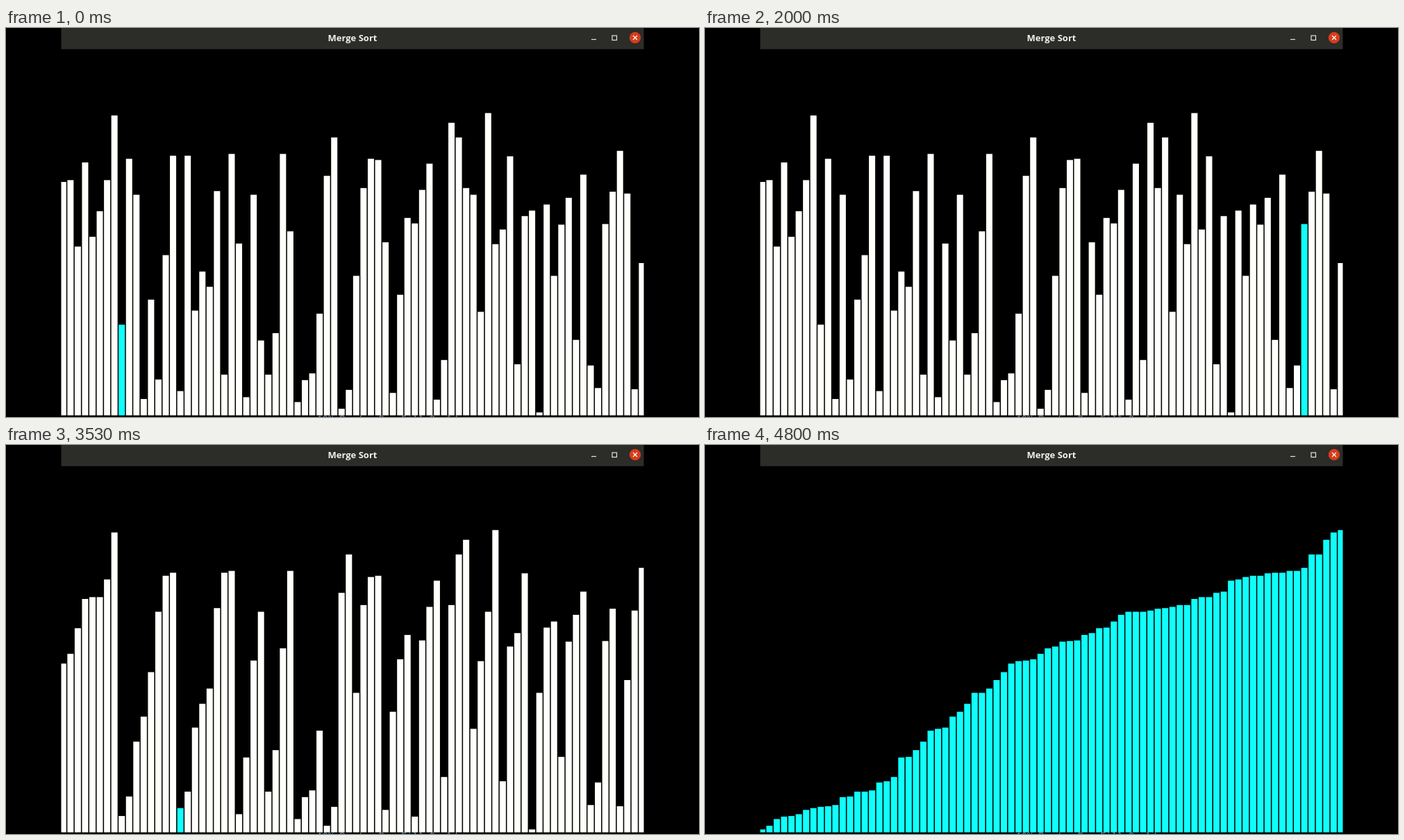
Animation, 998 px wide and 561 px high, one loop 4990 ms. Source, as an HTML page with a canvas:

```html
<!DOCTYPE html>
<html lang="en">
<head>
<meta charset="utf-8">
<title>Merge Sort</title>
<style>
  html, body { margin: 0; height: 100%; overflow: hidden; background: #000; }
  canvas { display: block; }
</style>
</head>
<body>
<canvas id="stage" width="998" height="561"></canvas>
<script>
const ctx = document.getElementById("stage").getContext("2d");
const LOOP = 4990;
const LEFT = 79.5, RIGHT = 918.5, TITLE_HEIGHT = 30.5, FLOOR = 558.8;
const SCALE = 0.8793, PITCH = 12 * SCALE, BAR_WIDTH = 9, FIRST_BAR = 77.8;
const BARS = 80, MAX_VALUE = 500;
const FIRST_STEP = 4.744, STEPS_PER_TICK = 1.094;
const WHITE = "#fffffb", CYAN = "#10fffb";

// Additive feedback generator, as used by the C library's rand().
function randomValues(count, seed) {
  const warmUp = 344, state = [seed];
  for (let i = 1; i < warmUp + count; i++) {
    if (i < 31) state[i] = (16807 * state[i - 1]) % 2147483647;
    else if (i < 34) state[i] = state[i - 31];
    else state[i] = (state[i - 3] + state[i - 31]) >>> 0;
  }
  return state.slice(warmUp).map(word => (word >>> 1) % MAX_VALUE);
}

// Bottom-up merge sort: one step per merged block, marked at its first bar.
function mergeSteps(values) {
  const steps = [];
  for (let size = 1; size < values.length; size *= 2) {
    for (let low = 0; low + size < values.length; low += 2 * size) {
      const high = low + 2 * size;
      values = [
        ...values.slice(0, low),
        ...values.slice(low, high).sort((a, b) => a - b),
        ...values.slice(high)
      ];
      steps.push({ values, mark: low });
    }
  }
  return steps;
}
const steps = mergeSteps(randomValues(BARS, 1));

// Three pictures every 200 ms.
function tickAt(time) {
  const rest = time % 200;
  return 3 * Math.floor(time / 200) + (rest >= 70) + (rest >= 130);
}

function rect(color, x, y, w, h) {
  ctx.fillStyle = color;
  ctx.fillRect(x, y, w, h);
}

function line(...points) {
  ctx.beginPath();
  points.forEach(([x, y], i) => i % 2 ? ctx.lineTo(x, y) : ctx.moveTo(x, y));
  ctx.stroke();
}

function drawWindow() {
  rect("#000", 0, 0, 998, 561);
  rect("#2c2c29", LEFT, 0, RIGHT - LEFT, TITLE_HEIGHT);

  ctx.textAlign = "center";
  ctx.fillStyle = "#f0f0ec";
  ctx.font = "bold 13px 'Open Sans', 'Noto Sans', sans-serif";
  ctx.fillText("Merge Sort", 499, 19.3);

  ctx.strokeStyle = "#e4e4e0";
  ctx.lineWidth = 1.2;
  line([843, 16.5], [850, 16.5]);
  ctx.strokeRect(873, 11, 6.5, 6.5);

  ctx.fillStyle = "#d63c1a";
  ctx.beginPath();
  ctx.arc(906, 14, 8.2, 0, 2 * Math.PI);
  ctx.fill();
  ctx.strokeStyle = "#fff";
  line([903, 11], [909, 17], [909, 11], [903, 17]);

  // Tips of a line of text behind the window
  ctx.fillStyle = "#6d8fa5";
  ctx.font = "13.5px 'Liberation Mono', monospace";
  ctx.fillText("10% Random Bar Fill Could", 549, 568.3);
}

function drawBars({ values, mark }, done) {
  ctx.save();
  ctx.beginPath();
  ctx.rect(LEFT, TITLE_HEIGHT, RIGHT - LEFT, FLOOR - TITLE_HEIGHT);
  ctx.clip();
  values.forEach((value, i) => {
    const color = done || i === mark ? CYAN : WHITE;
    const height = value * SCALE;
    rect(color, FIRST_BAR + PITCH * i, FLOOR - height, BAR_WIDTH, height);
  });
  ctx.restore();
}

function render(now) {
  const step = Math.floor(FIRST_STEP + STEPS_PER_TICK * tickAt(now % LOOP));
  drawWindow();
  drawBars(steps[Math.min(step, steps.length - 1)], step >= steps.length);
  requestAnimationFrame(render);
}
requestAnimationFrame(render);
</script>
</body>
</html>
```
